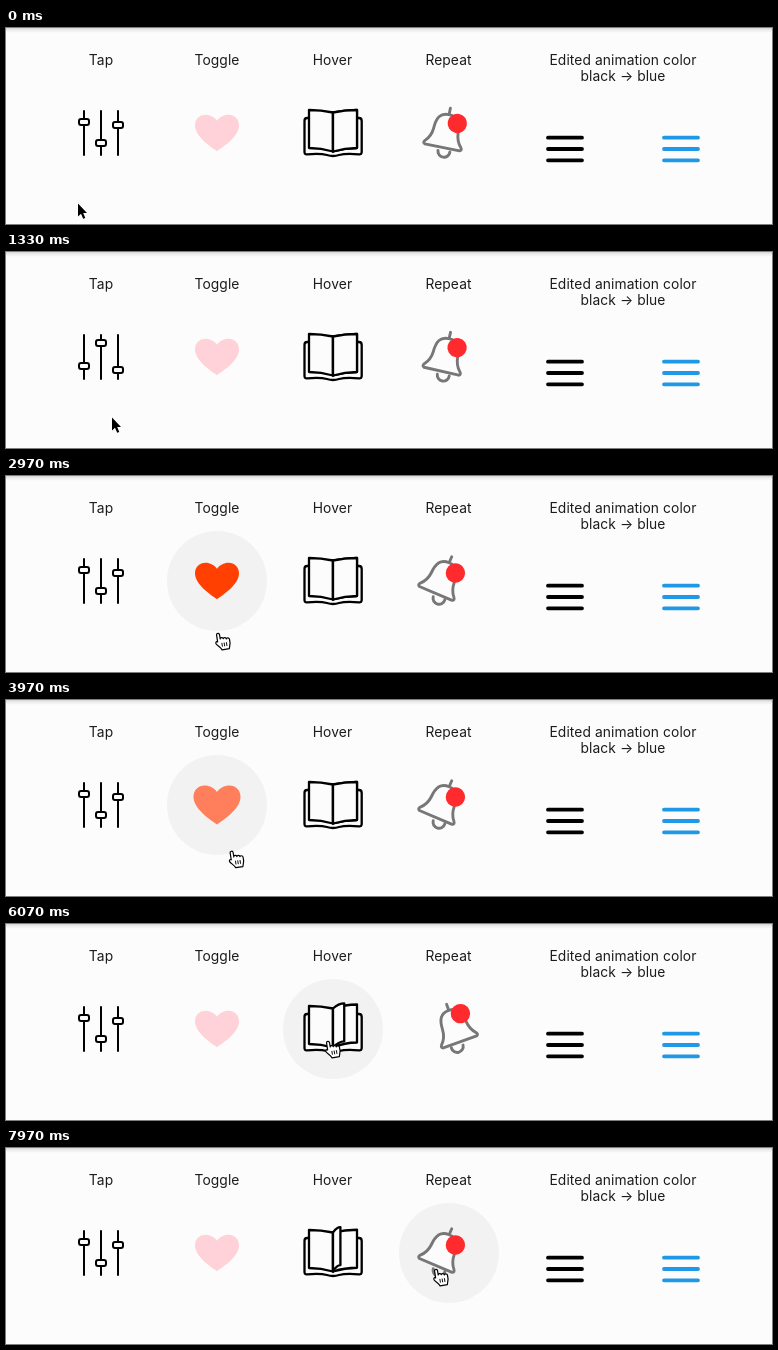
Recreate the animation shown at these times as an HTML page. Size 766 by 196 pixels, loop 8000 ms.

```html
<!DOCTYPE html>
<html lang="en">
<head>
<meta charset="utf-8">
<title>Icon animations</title>
<style>
html, body { margin: 0; width: 100%; height: 100%; overflow: hidden; background: #fcfcfc; }
svg { display: block; width: 100vw; height: 100vh; }
text { font: 13.8px Inter, "Liberation Sans", sans-serif; letter-spacing: .09px; fill: #1c1c1c; text-anchor: middle; }
.line { fill: none; stroke: #000; stroke-linecap: round; stroke-linejoin: round; }
.page { fill: #fcfcfc; }
</style>
</head>
<body>
<svg viewBox="0 0 766 196">
  <defs>
    <linearGradient id="shade" x2="0" y2="1">
      <stop offset="0" stop-color="#d6d6d6"/>
      <stop offset=".5" stop-color="#efefef"/>
      <stop offset="1" stop-color="#fcfcfc"/>
    </linearGradient>
  </defs>
  <rect width="766" height="196" fill="#fcfcfc"/>
  <rect width="766" height="5" fill="url(#shade)"/>
  <circle id="halo" cy="105" r="50" fill="#f2f2f2"/>

  <text x="95" y="37">Tap</text>
  <text x="211" y="37">Toggle</text>
  <text x="326.5" y="37">Hover</text>
  <text x="442.5" y="37">Repeat</text>
  <text x="617" y="37">Edited animation color</text>
  <text x="617" y="53">black → blue</text>

  <g class="line" stroke-width="2">
    <path d="M78 83V127M95 83V127M112 83V127"/>
    <g id="knobs" class="page">
      <rect x="73" y="-3" width="10" height="6" rx="2"/>
      <rect x="90" y="-3" width="10" height="6" rx="2"/>
      <rect x="107" y="-3" width="10" height="6" rx="2"/>
    </g>
  </g>

  <path id="heart" d="M0 18.5C-6 14-22 4-22-7.5C-22-13.5-17.5-18-11.5-18C-7-18-2.5-15.5 0-12C2.5-15.5 7-18 11.5-18C17.5-18 22-13.5 22-7.5C22 4 6 14 0 18.5Z"/>

  <g class="line" stroke-width="2.3">
    <path class="page" d="M303 90H301Q298.500 90 298.500 93V124Q298.500 126.500 301 126.300Q314 125 321 127Q327 129 333 127Q340 125 353 126.300Q355.700 126.500 355.700 124V93Q355.700 90 353 90H351"/>
    <path id="left" class="page"/>
    <path id="right" class="page"/>
    <path id="flap" class="page"/>
  </g>

  <g class="line" style="stroke:#777" stroke-width="2.9">
    <path id="clapper" d="M436.800 123.500A6 6 0 0 0 448.800 123.500"/>
    <g id="bell">
      <path d="M443 80V86"/>
      <path class="page" d="M425 120Q422.500 119 424.500 116.500Q430 111 430.500 103C431 92 434 86.500 443 86.500C452 86.500 455 92 455.500 103Q456 111 461 116.500Q463 119 460.500 120Z"/>
      <circle cx="452.800" cy="93.500" r="9.700" fill="#ff2a2d" stroke="none"/>
    </g>
  </g>

  <g class="line" stroke-width="3.800">
    <path d="M542 109.700H576M542 121H576M542 132.300H576"/>
    <path style="stroke:#2098e8" d="M658 109.700H692M658 121H692M658 132.300H692"/>
  </g>

  <g id="cursor" stroke-linejoin="round">
    <path id="arrow" d="M1 .5V13.500L4 10.800L6.200 15.800L8.300 14.900L6.200 10H10Z" stroke="#fff" stroke-width="1.400" paint-order="stroke"/>
    <g id="hand" transform="translate(.3 .4) rotate(-9)" fill="#fff" stroke="#000" stroke-width="1.200" stroke-linecap="round">
      <path d="M-1 8.500V1.600a1.500 1.500 0 0 1 3 0V6c0-1.600 3-1.600 3.100.2c0-1.400 3-1.300 3 .6c0-1.200 3-1 3 .8v4L9.500 17H2.200C1 14-1 13-2.700 10.500C-3.600 8.800-2.200 7.500-1 8.500Z"/>
      <path d="M3 10.500V13.500M5.300 10.500V13.500M7.600 10.500V13.500" stroke-width=".9"/>
    </g>
  </g>
</svg>
<script>
const LOOP = 8000;
const CENTERS = [95, 211, 327, 443];
const HOVER = [4670, 7215];
const KNOBS = [[94, 114], [115, 91], [97, 118]];

// Cursor stops: time, x, y.
const STOPS = [
  [0, 71, 175], [600, 97, 128], [800, 97, 128], [1330, 105, 165], [1600, 118, 171],
  [2400, 212, 140], [2970, 211, 157], [3850, 213, 142], [4200, 255, 174],
  [4870, 337, 116], [6070, 321, 117], [7130, 354, 115], [7600, 430, 134], [7970, 429, 121]
];

const el = id => document.getElementById(id);
const set = (id, name, value) => el(id).setAttribute(name, value);
const mix = (a, b, u) => a + (b - a) * u;
const part = (t, from, to) => Math.min(1, Math.max(0, (t - from) / (to - from)));
const ease = (t, from, to) => {
  const u = part(t, from, to);
  return u * u * (3 - 2 * u);
};
const bump = (t, from, to) => Math.sin(Math.PI * part(t, from, to));

function drawCursor(t) {
  const next = STOPS.findIndex(s => s[0] > t);
  const b = STOPS.at(next), a = next < 0 ? b : STOPS[next - 1];
  const u = a === b ? 0 : ease(t, a[0], b[0]);
  const x = mix(a[1], b[1], u), y = mix(a[2], b[2], u);
  const over = CENTERS.find(c => Math.hypot(x - c, y - 105) < 53);
  set("cursor", "transform", `translate(${x} ${y})`);
  set("halo", "cx", over || -99);
  set("hand", "visibility", over ? "visible" : "hidden");
  set("arrow", "visibility", over ? "hidden" : "visible");
}

function drawSliders(t) {
  const u = ease(t, 800, 1270) - ease(t, 1560, 2050);
  KNOBS.forEach(([a, b], i) =>
    el("knobs").children[i].setAttribute("transform", `translate(0 ${mix(a, b, u)})`));
}

function drawHeart(t) {
  const u = ease(t, 2400, 2700) - ease(t, 3800, 4180);
  const size = 1 + .12 * bump(t, 2430, 2850) + .08 * bump(t, 3830, 4250);
  set("heart", "transform", `translate(211 104.8) scale(${size})`);
  set("heart", "fill", `rgb(255 ${mix(209, 64, u)} ${mix(217, 0, u)})`);
}

// A sheet hinged on the spine, with its outer edge at x.
function sheet(x, y) {
  const mid = (327 + x) / 2;
  return `M327 84.5Q${mid} ${y} ${x} ${y}V${y + 38}Q${mid} ${y + 38} 327 123.5Z`;
}

// Each hover second, a page lifts upright, then falls to the left.
function drawBook(t) {
  const phase = t < HOVER[0] ? 0 : (Math.min(t, HOVER[1]) - HOVER[0]) % 1000;
  const angle = Math.PI * (.345 * ease(phase, 100, 400) + .655 * part(phase, 400, 900) ** 2);
  set("left", "d", sheet(303, 82));
  set("right", "d", sheet(351, 82 - 1.5 * bump(phase, 250, 560)));
  set("flap", "d", sheet(327 + 24 * Math.cos(angle), 82 - 3 * Math.sin(angle)));
}

// A fading swing, once per second.
function drawBell(t) {
  const s = Math.min(655, Math.max(25, (t + 200) % 1000));
  const angle = 31 * Math.cos((s - 200) / 291) * Math.sin((s - 25) * Math.PI / 200);
  set("bell", "transform", `rotate(${angle} 442.5 87)`);
  set("clapper", "transform", `rotate(${angle * .67} 442.5 87)`);
}

const start = performance.now();
function tick() {
  const t = (performance.now() - start) % LOOP;
  for (const draw of [drawCursor, drawSliders, drawHeart, drawBook, drawBell]) draw(t);
  requestAnimationFrame(tick);
}
tick();
</script>
</body>
</html>
```
